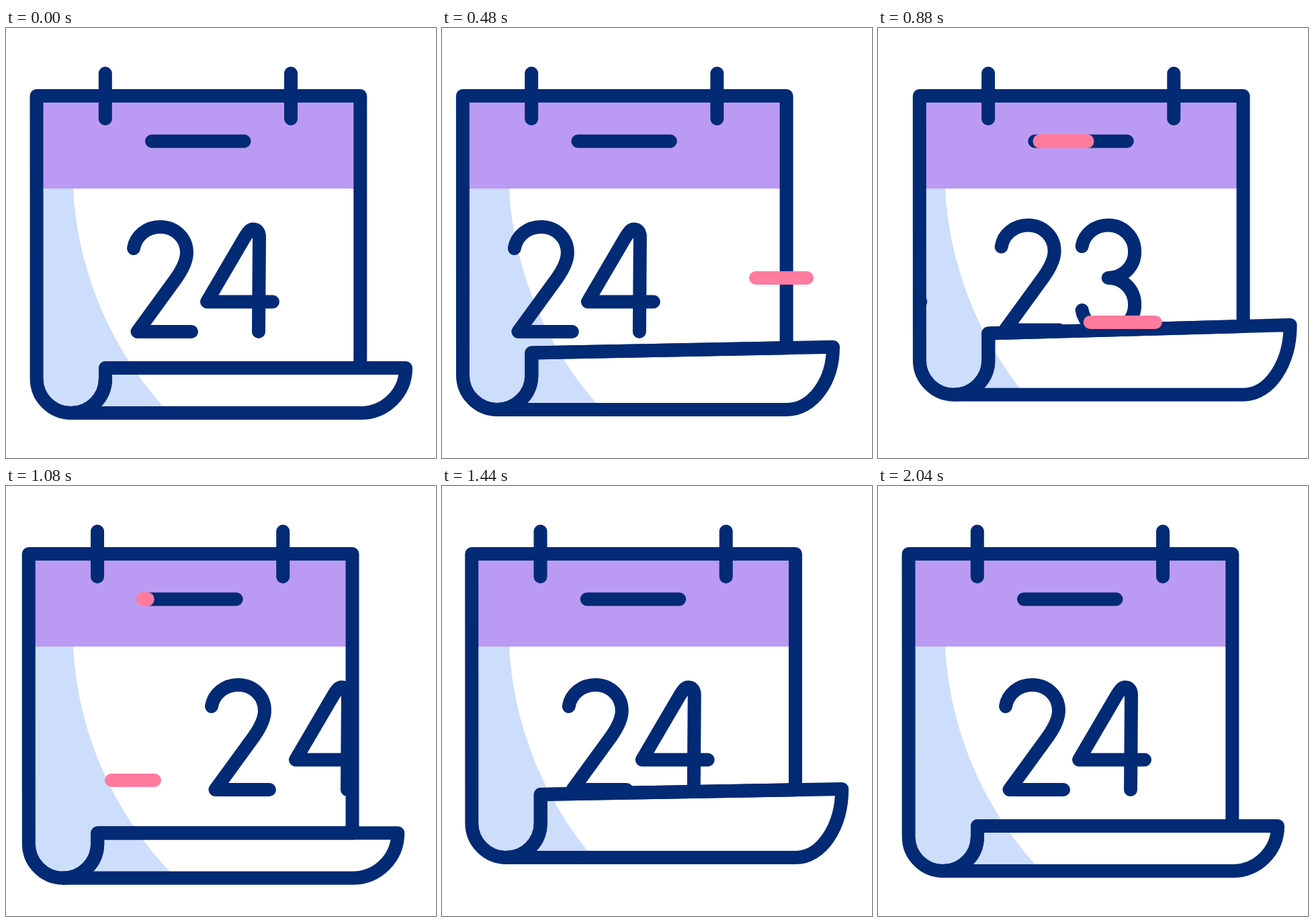
These frames come from a looping animation (640 px wide and 640 px high, 2880 ms). An HTML page with a canvas:

```html
<!DOCTYPE html>
<html lang="en">
<head>
<meta charset="utf-8">
<title>Calendar</title>
<style>
  html, body { margin: 0; width: 100%; height: 100%; overflow: hidden; background: #fff; }
  canvas { display: block; width: 640px; height: 640px; }
</style>
</head>
<body>
<canvas id="stage" width="640" height="640"></canvas>
<script>
const ctx = document.getElementById('stage').getContext('2d');
const LOOP = 2880, STEP = 40;
const NAVY = '#022a75', PURPLE = '#bb9af3', BLUE = '#cdddfc', PINK = '#ff7c9f';

const ease = {
  sine: u => (1 - Math.cos(Math.PI * u)) / 2,
  lin: u => u,
  in: u => u ** 2.5,
  out: u => 1 - (1 - u) ** 2.5,
  jump: u => 0
};

// Each key is [time, value, easing towards the next key].
function at(keys, t) {
  if (t <= keys[0][0]) return keys[0][1];
  for (let i = 1; i < keys.length; i++) {
    const [t0, v0, e = 'sine'] = keys[i - 1];
    const [t1, v1] = keys[i];
    if (t < t1) return v0 + (v1 - v0) * ease[e]((t - t0) / (t1 - t0));
  }
  return keys[keys.length - 1][1];
}

const sway = [[0, 0], [270, 33], [570, -27], [836, 18], [1130, -14], [1540, .8], [1800, -.5], [2040, 0]];
const drop = [[0, 0], [270, 26], [730, -46], [1120, 12], [1435, -20], [1740, 1], [2040, 0]];
const lift = [[300, 0], [700, -41], [730, -41], [1070, 0], [1120, 0], [1440, -27], [1760, 0]];
const tilt = [[300, 0], [700, -21], [730, -21], [1070, 0], [1120, 0], [1440, -8], [1700, 0]];

const leave = [[0, 0], [270, 23, 'in'], [640, -350, 'jump']];
const pass = from => [[540, from, 'out'], [815, 0, 'in'], [1020, -400]];
const two = new Path2D('M190 328C193 309 210 296 229.5 296C252 296 269 313 269 334.5C269 348 260 363 253 373L195.5 452H276');
const four = new Path2D('M397 407.5H299L355 312C362 301 364 299.5 368 299.5C373 299.5 377 303 377 311L376 452');
const three = new Path2D('M310 325C313 306 330 293.5 349 293.5C371 293.5 388.5 311 388.5 333C388.5 355 371 372 349 372C371 372 388.5 389 388.5 412C388.5 434 371 451.5 349 451.5C330 451.5 313 438 310 420');
const digits = [
  { path: two, y: 0, from: 0, to: LOOP, x: [...leave, [920, 440, 'out'], [1330, 0]] },
  { path: four, y: 0, from: 0, to: LOOP, x: [...leave, [920, 495, 'out'], [1330, 0]] },
  { path: two, y: -2.5, from: 540, to: 1020, x: pass(425) },
  { path: three, y: 0, from: 540, to: 1020, x: pass(1480) }
];

const streaks = [
  { y: 372, from: 440, to: 880,
    head: [[420, 543, 'lin'], [480, 467, 'lin'], [720, 176, 'lin'], [745, 157]],
    tail: [[480, 543, 'lin'], [720, 317, 'lin'], [820, 221, 'lin'], [880, 157]] },
  { y: 438, from: 700, to: 1140,
    head: [[680, 547, 'lin'], [720, 511, 'lin'], [1010, 157]],
    tail: [[740, 547, 'lin'], [980, 317, 'lin'], [1080, 221, 'lin'], [1140, 157]] }
];
const glint = { y: 168.5, from: 660, to: 1110,
  head: [[640, 354, 'lin'], [720, 294, 'lin'], [900, 216]],
  tail: [[720, 353, 'lin'], [1080, 222, 'lin'], [1110, 216]] };

function line(x1, y1, x2, y2, color = NAVY) {
  ctx.strokeStyle = color;
  ctx.beginPath();
  ctx.moveTo(x1, y1);
  ctx.lineTo(x2, y2);
  ctx.stroke();
}

function streak(s, t) {
  if (t >= s.from && t < s.to) line(at(s.head, t), s.y, at(s.tail, t), s.y, PINK);
}

// White paper with a pale shade whose curved edge stays fixed on the stage.
function paper(shape, dx, inside) {
  ctx.save();
  ctx.clip(shape);
  ctx.fillStyle = BLUE;
  ctx.fillRect(-80, 0, 800, 640);
  ctx.fillStyle = '#fff';
  ctx.beginPath();
  ctx.arc(629.5 - dx, 210, 530.5, 0, 7);
  ctx.fill();
  if (inside) inside();
  ctx.restore();
}

function draw(t) {
  const dx = at(sway, t), b = at(drop, t);
  const left = 506 + b + at(lift, t), slant = at(tilt, t);
  const base = 573 + b, bend = base - 51.2, endX = 595 - slant * .19, endY = left + slant;
  const wallY = left + slant * (527 - 148) / (endX - 148);

  const page = new Path2D();
  page.moveTo(45.5, 101);
  page.lineTo(527.3, 101);
  page.lineTo(527.3, wallY);
  page.lineTo(148, left);
  page.lineTo(148, bend);
  page.arc(96.8, bend, 51.2, 0, Math.PI);
  page.closePath();

  const curl = new Path2D(), k = .448;
  curl.moveTo(148, left);
  curl.lineTo(endX, endY);
  curl.bezierCurveTo(endX, base + (endY - base) * k, 528 + (endX - 528) * .552, base, 528, base);
  curl.lineTo(96.8, base);
  curl.arc(96.8, bend, 51.2, Math.PI / 2, 0, true);
  curl.closePath();

  ctx.clearRect(0, 0, 640, 640);
  ctx.lineWidth = 20;
  ctx.lineCap = ctx.lineJoin = 'round';
  ctx.save();
  ctx.translate(dx, 0);

  paper(page, dx, () => {
    ctx.fillStyle = PURPLE;
    ctx.fillRect(45, 101, 483, 138);
    ctx.strokeStyle = NAVY;
    for (const d of digits) {
      if (t < d.from || t >= d.to) continue;
      ctx.save();
      ctx.translate(at(d.x, t), d.y);
      ctx.stroke(d.path);
      ctx.restore();
    }
  });
  paper(curl, dx);

  ctx.strokeStyle = NAVY;
  ctx.stroke(page);
  ctx.stroke(curl);
  line(147.8, 67.5, 147.8, 135);
  line(424, 67.5, 424, 135);
  line(217, 168.5, 354.5, 168.5);
  ctx.lineWidth = 21;
  streak(glint, t);
  ctx.restore();

  ctx.lineWidth = 20;
  streaks.forEach(s => streak(s, t));
}

const start = performance.now();
function tick() {
  const t = (performance.now() - start) % LOOP;
  draw(Math.floor(t / STEP) * STEP);
  requestAnimationFrame(tick);
}
tick();
</script>
</body>
</html>
```
